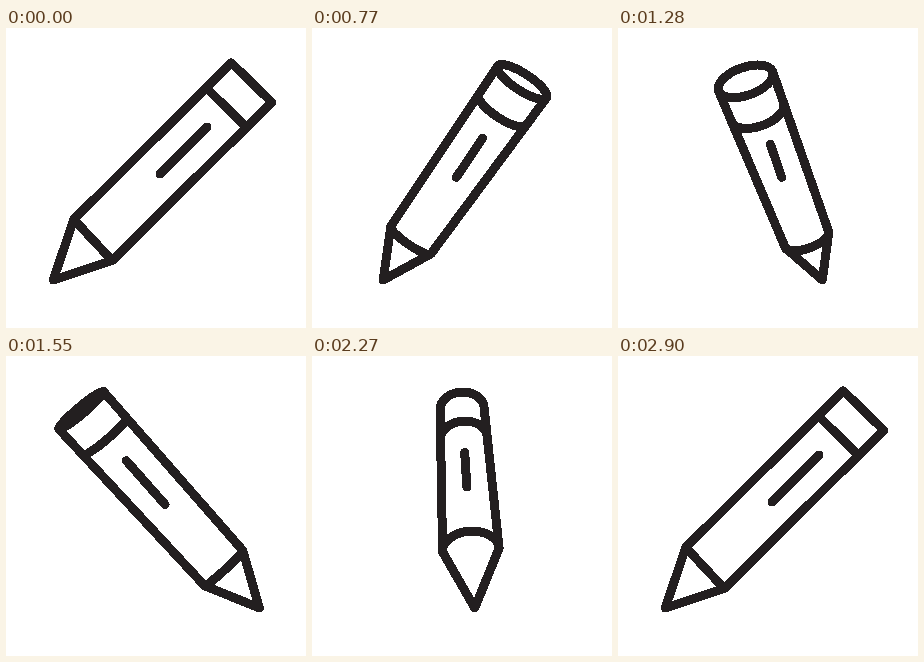
These frames come from a looping animation (300x300 px, 2.93 s). An HTML page:

```html
<!DOCTYPE html>
<html lang="en">
<head>
<meta charset="utf-8">
<title>Turning pencil</title>
<style>
  html, body { margin: 0; width: 100%; height: 100%; overflow: hidden; background: #fff; }
  svg { display: block; width: 100vw; height: 100vh; }
  path {
    fill: none; stroke: #231f20; stroke-width: 9;
    stroke-linecap: round; stroke-linejoin: round; shape-rendering: crispEdges;
  }
</style>
</head>
<body>
<svg viewBox="0 0 300 300"><path id="pencil"/></svg>
<script>
const LOOP = 2930, HOLD = 500, STEP = 30, STEPS = 80;
const AXIS = 154;
const pencil = document.getElementById('pencil');

const pt = p => p[0].toFixed(2) + ' ' + p[1].toFixed(2);
const mix = (a, b, u) => [a[0] + (b[0] - a[0]) * u, a[1] + (b[1] - a[1]) * u];
const poly = (...points) => 'M' + points.map(pt).join('L');

// A disc seen from the side: the two ends of its widest line.
function disc(x, y, hx, hy) {
  return { l: [x - hx, y - hy], r: [x + hx, y + hy] };
}

// Half an ellipse from the left end to the right end.
function arc({ l, r }, bulge, up) {
  const dx = r[0] - l[0], dy = r[1] - l[1];
  if (bulge < 0.05) return poly(l, r);
  const turn = Math.atan2(dy, dx) * 180 / Math.PI;
  return `M${pt(l)}A${Math.hypot(dx, dy) / 2} ${bulge} ${turn} 0 ${up ? 1 : 0} ${pt(r)}`;
}

// c and s: cosine and sine of the turn; s > 0 brings the blunt end nearer.
function outline(angle) {
  const c = Math.cos(angle), s = Math.sin(angle), q = s * s;
  const away = s < 0;
  const open = Math.abs(s) ** 1.6;
  const x = reach => AXIS + c * reach;

  const tip = [x(-106.8 - 5 * q), 252];
  const top = disc(x(91.5 - 42 * q), 54.5 - 1.5 * q,
    20.3 + 3.2 * s + 4.9 * q, c * (19.7 + 1.8 * s));
  const base = disc(x(-67 + (away ? 5 : -13) * q), 212 - (away ? 18 * q : 0),
    19.2 - 2.8 * s + 6.3 * q, c * (20.5 - 3.5 * s));
  const u = 0.159 + 0.045 * q;
  const ring = { l: mix(top.l, base.l, u), r: mix(top.r, base.r, u) };
  const mark = [
    [x(47 - 11.5 * s - 42 * q), 99 + 11.5 * s + 9 * q],
    [x(-7.5 * s - 18.5 * q), 146 + 9 * s - 6 * q]
  ];

  return poly(top.l, base.l, tip, base.r, top.r)
    + arc(top, 17 * open, true)
    + (away ? '' : arc(top, 17 * open, false))
    + arc(ring, 17 * open, away)
    + arc(base, (away ? 19 : 10) * open, away)
    + poly(...mark);
}

const start = performance.now();
function draw() {
  const t = Math.max(0, performance.now() - start) % LOOP;
  const step = Math.max(0, Math.floor((t - HOLD) / STEP)) % STEPS;
  pencil.setAttribute('d', outline(step / STEPS * 2 * Math.PI));
  requestAnimationFrame(draw);
}
draw();
</script>
</body>
</html>
```
